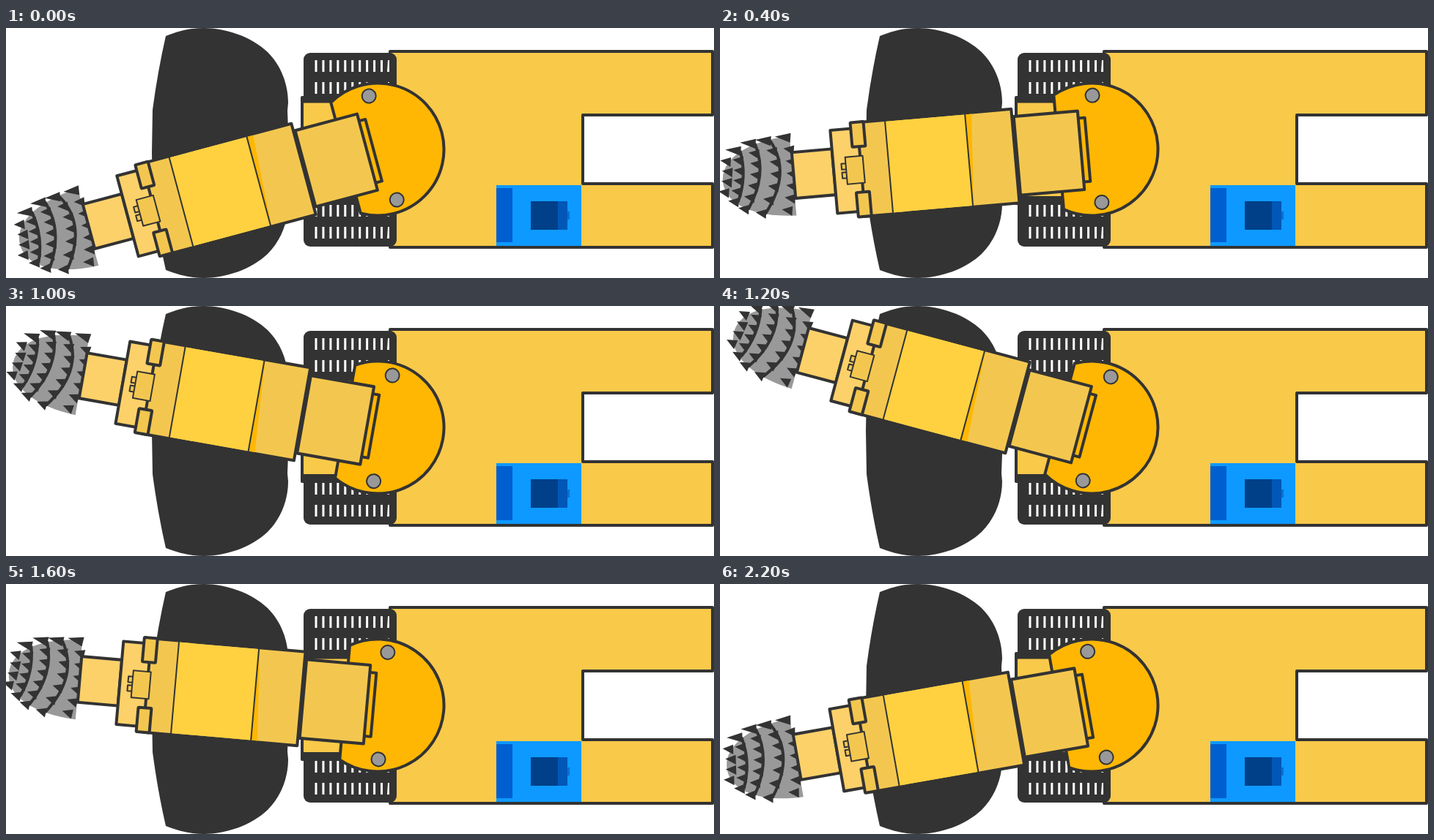
An HTML page for the animation above (2400 ms loop, 966 by 342 pixels).

```html
<!DOCTYPE html>
<html lang="en">
<head>
<meta charset="utf-8">
<title>Swinging cutter arm</title>
<style>
html, body { margin: 0; width: 100%; height: 100%; overflow: hidden; background: #fff; }
svg { display: block; }
.line { stroke: #333; stroke-width: 4; stroke-linejoin: round; }
.thin { stroke-width: 2; }
.tan { fill: #f3c74f; }
.pale { fill: #fcd16a; }
.orange { fill: #ffb703; }
.body { fill: #f9c94a; }
.grey { fill: #999; }
.dark { fill: #333; }
</style>
</head>
<body>
<svg width="966" height="342" viewBox="0 0 966 342">
  <path class="dark" d="M218 11C238 3 254 0 270 0C300 0 335 12 357 33C376 52 385 78 385 102L384 113L385 140V202L384 229L385 240C385 264 376 290 357 309C335 330 300 342 270 342C254 342 238 339 218 331Q207 283 200 230L199 171L200 112Q207 59 218 11Z"/>

  <path class="line body" d="M524 32H964V119H787V213H964V300H524Z"/>
  <path fill="#0d99ff" d="M669 215h116v83h-116z"/>
  <path fill="#005fd0" d="M669 219h22v74h-22z"/>
  <path fill="#004089" d="M716 237h37v39h-37z"/>
  <path fill="#0057b8" d="M753 237h13v39h-13z"/>
  <path fill="#0a70d2" d="M766 251h3v11h-3z"/>

  <rect class="dark" x="406" y="34" width="127" height="265" rx="9"/>
  <path id="slots" fill="#fff"/>
  <rect class="dark" x="402" y="93" width="66" height="149" rx="2"/>
  <path class="body" d="M406 102.500H500V230H406Z"/>

  <g id="arm">
    <path class="line orange" stroke-width="3.500" d="M-45 -78.500A90.500 90.500 0 1 1 -45 78.500Z"/>
    <circle class="line thin grey" cx="7.500" cy="-73.500" r="9.500"/>
    <circle class="line thin grey" cx="7.500" cy="73.500" r="9.500"/>

    <path class="grey" d="M-409 -54C-465 -52 -505 -32 -505 0C-505 32 -465 53 -409 55Z"/>
    <path id="rails" fill="none" stroke="#333" stroke-width="4"/>
    <path id="spikes" class="dark"/>

    <path class="line pale" d="M-408 -31.500H-353V31.500H-408Z"/>
    <path class="line pale" d="M-353 -57H-312V57H-353Z"/>
    <path class="line orange" d="M-20 -44H-5.500V43.500H-20Z"/>
    <path class="line tan" d="M-102 -54H-14.500V54H-102Z"/>
    <path class="line tan" d="M-315.500 -64.500H-104.500V64.500H-315.500Z"/>
    <path fill="#ffd140" d="M-277.500 -62.500H-168V62.500H-277.500Z"/>
    <path id="strip" class="orange" d="M-168 -62.500H-159L-167 62.500H-168Z"/>
    <path class="line thin" d="M-277.500 -63V63M-168 -63V63"/>
    <rect class="line tan" x="-325" y="-65" width="18" height="33.500" rx="1"/>
    <rect class="line tan" x="-325" y="31" width="18" height="33.500" rx="1"/>
    <path class="line thin tan" d="M-342 -10h7v8h-7zM-342 2h7v8h-7z"/>
    <path class="line thin tan" d="M-336 -18.500H-312V18.500H-336Z"/>
  </g>
</svg>
<script>
const el = id => document.getElementById(id);
const setPath = (id, d) => el(id).setAttribute('d', d);

let slots = '';
for (const y of [44, 74, 242, 272])
  for (let i = 0; i < 11; i++) slots += `M${421.5 + i * 9.95} ${y}h${i < 10 ? 3 : 2}v16h-3z`;
setPath('slots', slots);

// Each row of cutter teeth: top, control and bottom points, then tooth count.
const rows = [
  [-493, -26, -489, -4, -499, 16, 4],
  [-478, -40, -471, -4, -487, 30, 6],
  [-457, -48, -443, -4, -474, 41, 7],
  [-436, -50, -410, -4, -451, 49, 7],
  [-409, -52, -397, 0, -415, 48, 7]
];
let rails = '', spikes = '';
rows.forEach(([x0, y0, cx, cy, x1, y1, count], row) => {
  if (row > 0 && row < 4) rails += `M${x0} ${y0}Q${cx} ${cy} ${x1} ${y1}`;
  for (let i = 0; i < count; i++) {
    const t = i / (count - 1), u = 1 - t;
    const x = u * u * x0 + 2 * u * t * cx + t * t * x1;
    const y = u * u * y0 + 2 * u * t * cy + t * t * y1;
    const reach = i || !row ? 13 : 20;
    spikes += `M${x - reach} ${y - 3}L${x + 2} ${y - 6}L${x} ${y + 7}Z`;
  }
});
setPath('rails', rails);
setPath('spikes', spikes);

function draw(now) {
  const step = Math.floor(now / 200) % 12;
  const angle = 15 - 5 * Math.abs(step - 6);
  el('arm').setAttribute('transform', `translate(507 166) rotate(${angle})`);
  el('strip').setAttribute('transform', `scale(1 ${angle > 0 ? -1 : 1})`);
  requestAnimationFrame(draw);
}
draw(performance.now());
</script>
</body>
</html>
```
